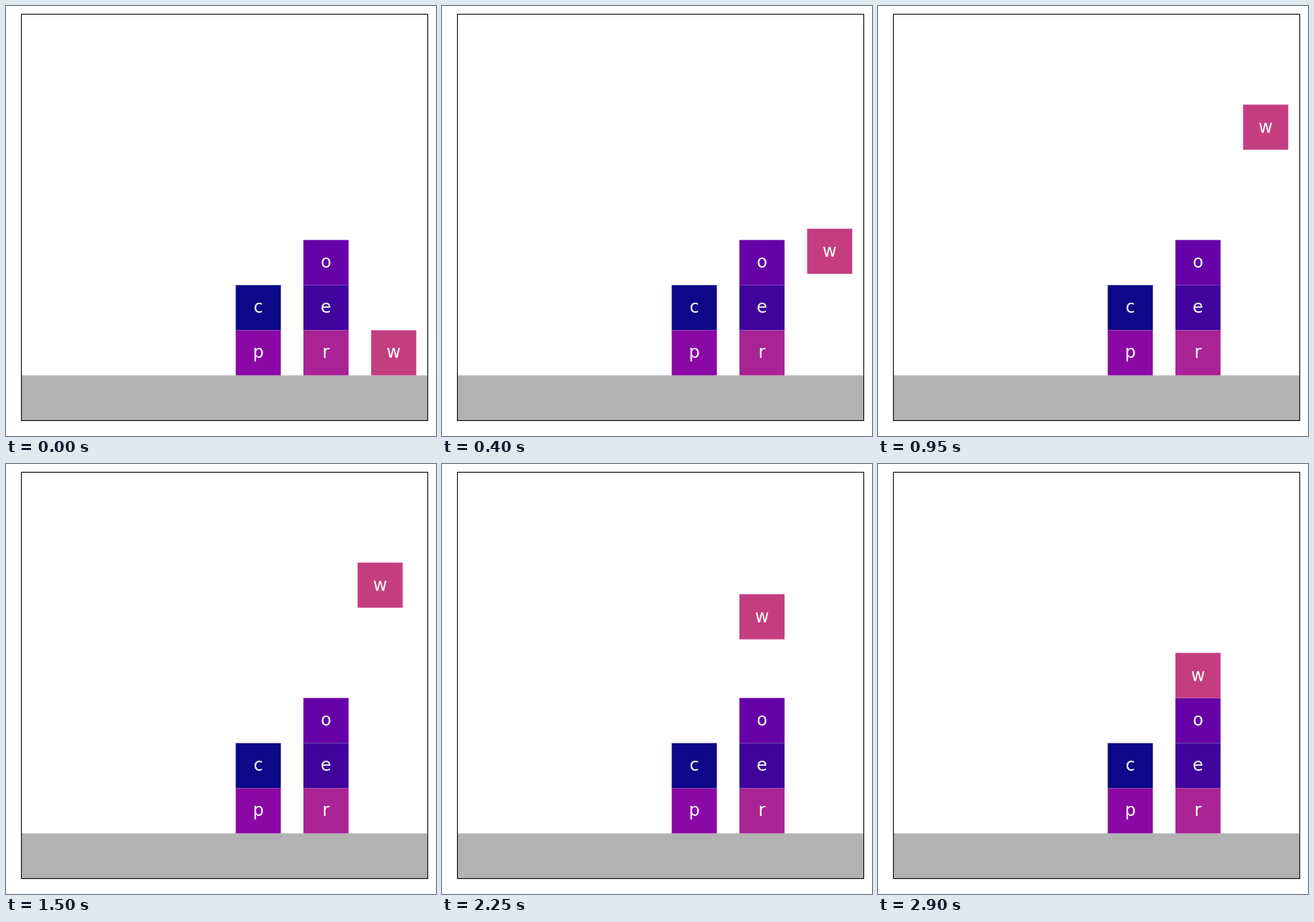
Write an HTML page that moves like this. It is 600 px wide and 600 px high and loops after 2950 ms.

```html
<!DOCTYPE html>
<html lang="en">
<head>
<meta charset="utf-8">
<title>Block stacking</title>
<style>
  html, body { margin: 0; width: 100%; height: 100%; overflow: hidden; background: #fff; }
  svg { display: block; width: 100%; height: 100%; }
  text { font: 24px "DejaVu Sans", sans-serif; fill: #fff; text-anchor: middle; }
</style>
</head>
<body>
<svg id="stage" viewBox="0 0 600 600">
  <rect x="21.5" y="515.4" width="567" height="63" fill="#b2b2b2"/>
  <rect x="21.5" y="11.5" width="567" height="567" fill="none" stroke="#000" stroke-width="1.1"/>
</svg>
<script>
const UNIT = 62.97, FLOOR = 515.4, COLUMN_GAP = 1.5;
const FRAME_MS = 50, FRAME_COUNT = 59;
const stage = document.getElementById("stage");

function add(parent, tag, attributes) {
  const node = document.createElementNS("http://www.w3.org/2000/svg", tag);
  for (const name in attributes) node.setAttribute(name, attributes[name]);
  return parent.appendChild(node);
}

// Columns count from the left pile, levels from the floor.
function place(block, column, level) {
  const x = 320.55 + column * COLUMN_GAP * UNIT;
  const y = FLOOR - (level + 1) * UNIT;
  block.setAttribute("transform", `translate(${x} ${y})`);
}

function addBlock(letter, color, column, level) {
  const block = add(stage, "g", {});
  add(block, "rect", { width: UNIT, height: UNIT, fill: color });
  add(block, "text", { x: UNIT / 2, y: 39 }).textContent = letter;
  place(block, column, level);
  return block;
}

addBlock("c", "#0d0887", 0, 1);
addBlock("p", "#8a09a5", 0, 0);
addBlock("o", "#6600a7", 1, 2);
addBlock("e", "#40049d", 1, 1);
addBlock("r", "#aa2395", 1, 0);
const mover = addBlock("w", "#c43e7f", 2, 0);

const clamp = (value, max) => Math.max(0, Math.min(max, value));

function draw(time) {
  const frame = Math.floor(time / FRAME_MS) % FRAME_COUNT;
  // Lift and shift each start with a double step.
  const lift = frame < 1 ? 0 : clamp((frame + 1) / 4, 5);
  const shift = frame < 30 ? 0 : clamp((frame - 28) / 10, 1);
  const drop = clamp((frame - 38) / 10, 2);
  place(mover, 2 - shift, lift - drop);
}

const start = performance.now();
function tick() {
  draw(performance.now() - start);
  requestAnimationFrame(tick);
}
tick();
</script>
</body>
</html>
```
